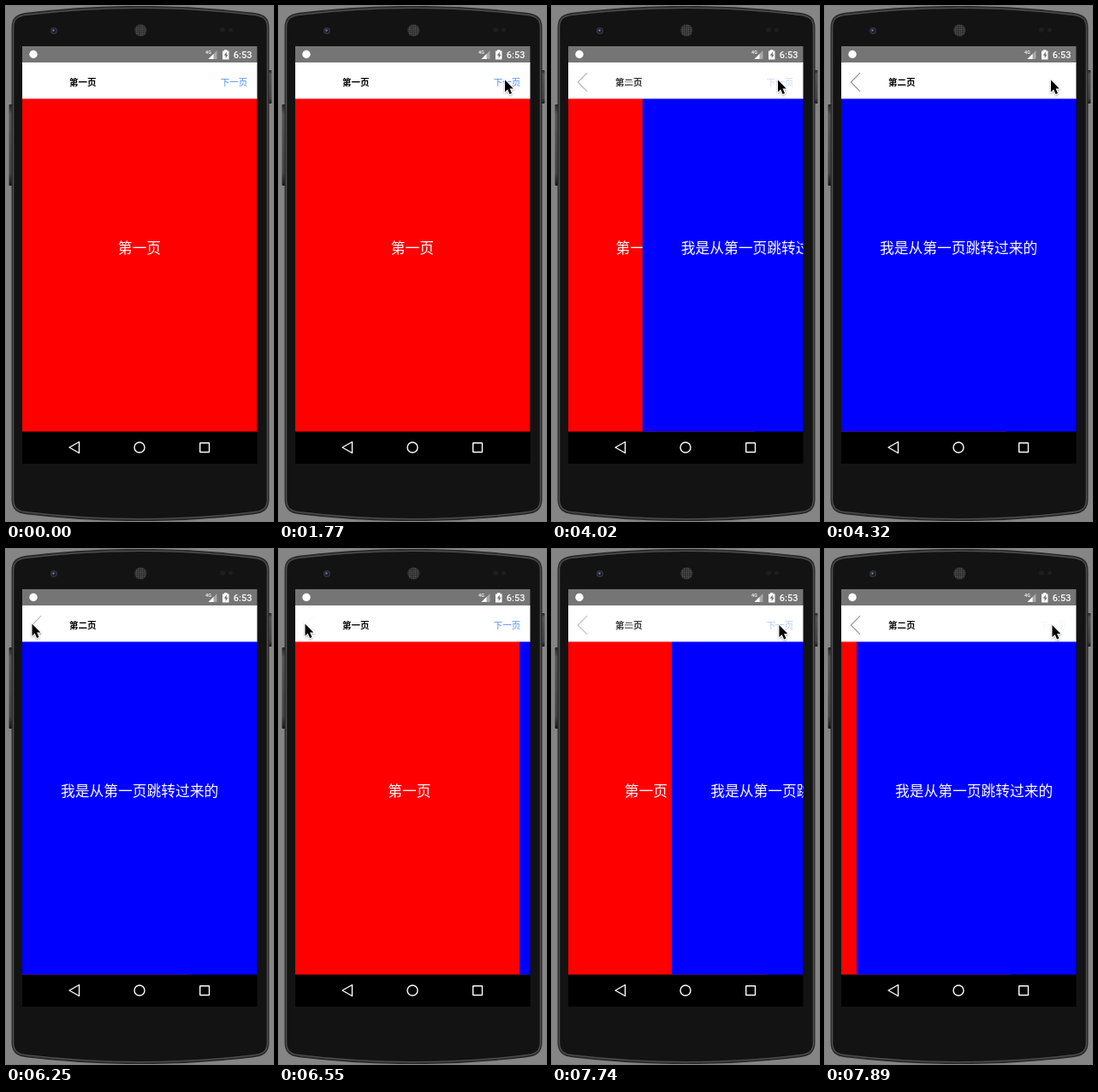
An HTML page that plays this animation: 312x602 px, repeating every 8 s.

```html
<!DOCTYPE html>
<html lang="zh-CN">
<head>
<meta charset="utf-8">
<title>Page transition</title>
<style>
  html, body { margin: 0; width: 100%; height: 100%; overflow: hidden; background: #858585; }
  svg { display: block; width: 312px; height: 602px; }
  text { font-family: 'Noto Sans CJK SC', 'Noto Sans CJK', sans-serif; }
  .bar { font-size: 10.5px; }
  .title { font-weight: 700; }
  .body { font-size: 16.75px; fill: #fff; text-anchor: middle; }
  .status { font-family: Roboto, sans-serif; font-weight: 500; fill: #fff; }
</style>
</head>
<body>
<svg viewBox="0 0 312 602">
  <defs>
    <clipPath id="screen"><rect x="19" y="108" width="274.5" height="389.5"/></clipPath>
    <pattern id="mesh" width="2.4" height="2.4" patternUnits="userSpaceOnUse">
      <rect width="2.4" height="2.4" fill="#2b2b2b"/>
      <circle cx="1.2" cy="1.2" r=".75" fill="#5a5a5a"/>
    </pattern>
    <linearGradient id="key" x2="0" y2="1">
      <stop stop-color="#222"/><stop offset=".12" stop-color="#555"/>
      <stop offset=".85" stop-color="#444"/><stop offset="1" stop-color="#151515"/>
    </linearGradient>
    <filter id="shadow" x="-50%" y="-50%" width="200%" height="200%">
      <feDropShadow dx="0" dy="1" stdDeviation="1" flood-opacity=".4"/>
    </filter>
  </defs>

  <!-- Phone -->
  <rect width="312" height="602" fill="#858585"/>
  <rect x="3.5" y="115" width="5" height="95" rx="1" fill="url(#key)"/>
  <rect x="306" y="75" width="4.5" height="39" rx="1" fill="url(#key)"/>
  <path d="M8 25C8 14 14 10.500 24 9.300Q156-6.500 289 9.300C300 10.500 306 14 306 25V577C306 588 300 591.500 289 592.700Q156 608.500 24 592.700C14 591.500 8 588 8 577Z"
        fill="#131313" stroke="#2a2a2a" stroke-width="3"/>
  <path d="M8.500 25C8.500 15 14 11.500 24 10.300Q156-5.500 289 10.300C300 11.500 305.500 15 305.500 25V577C305.500 587 300 590.500 289 591.700Q156 607.500 24 591.700C14 590.500 8.500 587 8.500 577Z"
        fill="none" stroke="#505050" stroke-width="1.200"/>
  <circle cx="56" cy="29" r="4" fill="#33333b"/>
  <circle cx="56" cy="29" r="2.500" fill="#191930"/>
  <circle cx="55.500" cy="28.500" r="1.200" fill="#77779a"/>
  <circle cx="157.300" cy="28.500" r="7" fill="url(#mesh)"/>
  <g fill="#1e1e1e"><circle cx="253" cy="28" r="3"/><circle cx="262.500" cy="28" r="2.500"/></g>

  <!-- Status bar -->
  <rect x="19" y="47" width="274.500" height="488" fill="#000"/>
  <rect x="19" y="47" width="274.500" height="19.500" fill="#757575"/>
  <circle cx="32" cy="56.500" r="4.700" fill="#fff"/>
  <text class="status" x="233" y="56" font-size="5.500">4G</text>
  <path d="M246.500 52V62H236.500Z" fill="#a8a8a8"/>
  <path d="M242.500 56V62H236.500Z" fill="#fff"/>
  <path d="M253 52.500h2v-1.300h3.500v1.300h2V62.500h-7.500Z" fill="#fff"/>
  <path d="M257.800 53.500l-3 4.300h1.800v3.200l3-4.300h-1.800Z" fill="#757575"/>
  <text class="status" x="265.800" y="60.800" font-size="11">6:53</text>

  <!-- Pages -->
  <g clip-path="url(#screen)">
    <g id="first">
      <rect x="19" y="108" width="274.500" height="390" fill="#f00"/>
      <text class="body" x="156" y="288.700">第一页</text>
    </g>
    <g id="second">
      <rect x="19" y="108" width="275" height="390" fill="#00f"/>
      <text class="body" x="156.200" y="288.700">我是从第一页跳转过来的</text>
    </g>
  </g>

  <!-- Header -->
  <rect x="19" y="66" width="274.500" height="42.300" fill="#fff"/>
  <rect x="19" y="107.700" width="274.500" height=".6" fill="#ccc"/>
  <text id="firstTitle" class="bar title" x="74" y="92.700">第一页</text>
  <text id="secondTitle" class="bar title" x="74" y="92.700">第二页</text>
  <text id="next" class="bar" x="250.700" y="92.700" fill="#4a8cf7">下一页</text>
  <path id="back" d="M41 78.200L30.300 89L41 99.800" fill="none" stroke="#929292" stroke-width="1.200"/>

  <!-- Navigation keys -->
  <g fill="none" stroke="#fff" stroke-width="1.400" stroke-linejoin="round">
    <path d="M74 516L85.500 509.500V522.500Z"/>
    <circle cx="156" cy="516" r="6"/>
    <rect x="226.700" y="510.700" width="10.800" height="10.800" rx=".6"/>
  </g>

  <path id="cursor" d="M0 0V14L3.200 11L5.600 16.500L8 15.500L5.600 10H9.800Z"
        stroke="#fff" stroke-width="1.600" paint-order="stroke" filter="url(#shadow)"/>
</svg>
<script>
const LOOP = 8000, WIDTH = 274.5, PARALLAX = 0.3;
const PUSH = 3863, POP = 6250, PUSH_AGAIN = 7614;

// Page updates: start, end, number of steps
const bursts = [[3870, 4320, 4], [6250, 6700, 4], [7590, 7890, 3]];

// Pointer moves: start, end, steps, target x, target y, easing
const linear = u => u;
const smooth = u => u * u * (3 - 2 * u);
const start = { x: 297, y: 799 };
const moves = [
  [300, 590, 3, 222, 139, linear],
  [890, 1770, 7, 264, 86.5, smooth],
  [4610, 5060, 4, 28, 88, smooth],
  [5510, 5660, 2, 30.5, 87.5, linear],
  [6700, 7000, 3, 274.5, 91, smooth],
  [7140, 7290, 2, 265.5, 89, linear]
];

const el = id => document.getElementById(id);
const [first, second, firstTitle, secondTitle, next, back, cursor] =
  ['first', 'second', 'firstTitle', 'secondTitle', 'next', 'back', 'cursor'].map(el);

const stepIndex = (t, from, to, count) =>
  Math.min(count - 1, Math.floor((t - from) * (count - 1) / (to - from)));

function heldTime(t) {
  let held = 0;
  for (const [from, to, count] of bursts)
    if (t >= from) held = from + stepIndex(t, from, to, count) * (to - from) / (count - 1);
  return held;
}

// Damped spring: tension 200, friction 26
function spring(ms) {
  const s = ms / 1000, w = Math.sqrt(31);
  if (s <= 0) return 0;
  if (s >= 0.445) return 1;
  return 1 - Math.exp(-13 * s) * (Math.cos(w * s) + 13 / w * Math.sin(w * s));
}

function pointerAt(t) {
  let { x, y } = start;
  for (const [from, to, count, tx, ty, ease] of moves) {
    if (t < from) break;
    const u = ease((stepIndex(t, from, to, count) + 1) / count);
    x += (tx - x) * u;
    y += (ty - y) * u;
  }
  return [x, y];
}

const place = (node, x, y = 0) => node.setAttribute('transform', `translate(${x} ${y})`);
const fade = (node, opacity) => node.setAttribute('opacity', opacity);

function draw(t) {
  const held = heldTime(t);
  const p = spring(held - PUSH) - spring(held - POP) + spring(held - PUSH_AGAIN);
  const nextPressed = held === 3870 || held === 7590;
  const backPressed = held === 6250;

  place(first, -PARALLAX * WIDTH * p);
  place(second, WIDTH * (1 - p));
  fade(firstTitle, 1 - p);
  fade(secondTitle, p);
  fade(next, (1 - p) * (nextPressed ? 0.35 : 1));
  fade(back, p * (backPressed ? 0.6 : 1));
  place(cursor, ...pointerAt(t));
}

function tick() {
  draw(performance.now() % LOOP);
  requestAnimationFrame(tick);
}
tick();
</script>
</body>
</html>
```
